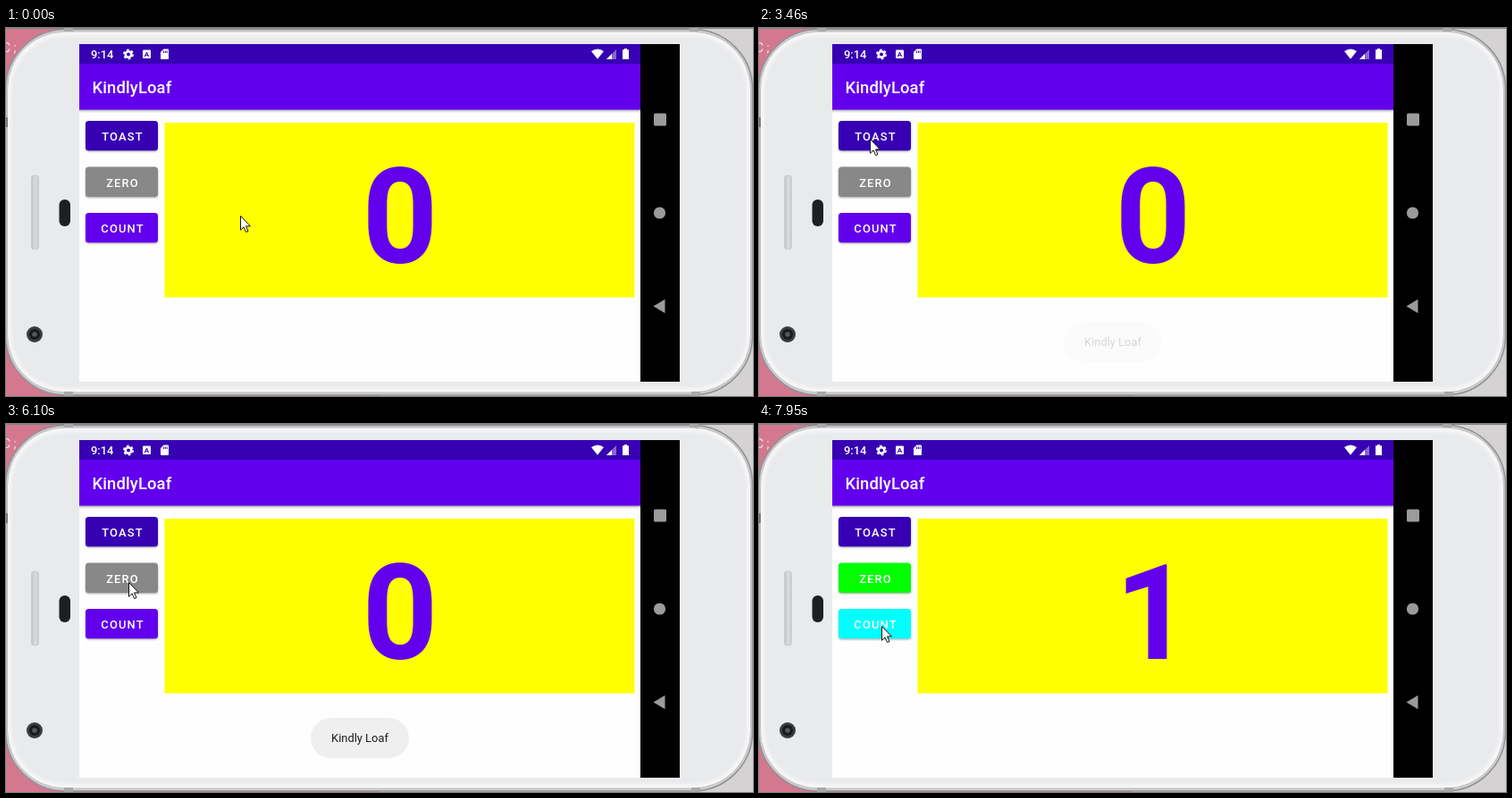
An HTML page for the animation above (8000 ms loop, 836 by 412 pixels).

```html
<!DOCTYPE html>
<html lang="en">
<head>
<meta charset="utf-8">
<title>Toast counter</title>
<style>
  html, body { margin: 0; width: 100%; height: 100%; overflow: hidden; }
  svg { display: block; width: 100%; height: 100%; font-family: Roboto, sans-serif; }
  .label { font-size: 12.9px; font-weight: 500; letter-spacing: 1.15px; fill: #fff; text-anchor: middle; }
  .up { filter: drop-shadow(0 1px 1px rgba(0, 0, 0, .35)); }
  .down { filter: drop-shadow(0 2.5px 3px rgba(0, 0, 0, .42)); }
</style>
</head>
<body>
<svg viewBox="0 0 836 412">
  <defs>
    <linearGradient id="drop" x2="0" y2="1">
      <stop stop-color="#000" stop-opacity=".32"/>
      <stop offset="1" stop-color="#000" stop-opacity="0"/>
    </linearGradient>
    <linearGradient id="slot">
      <stop stop-color="#c3c4c7"/><stop offset=".5" stop-color="#d9dadc"/><stop offset="1" stop-color="#cbccce"/>
    </linearGradient>
  </defs>

  <!-- desk and phone body -->
  <rect width="836" height="412" fill="#d3788f"/>
  <rect x="418" width="418" height="412" fill="#d5d2d4"/>
  <rect width="836" height="1" fill="#858588"/>
  <text x="-4" y="27" font-size="14" fill="#f6e6ea">C ;</text>
  <rect x="-.5" y="1.500" width="836" height="409.500" rx="67" fill="#cfcfd1" stroke="#929296" stroke-width="1.500"/>
  <rect x="1.500" y="4" width="832" height="404" rx="65" fill="#f6f6f7" stroke="#b4b4b7" stroke-width=".8"/>
  <rect x="6" y="9" width="823" height="394" rx="61" fill="#e9eaec" style="filter:blur(1.5px)"/>
  <path d="M65 0h10v4H65zM765 0h10v4h-10zM65 407h10v5H65zM767 407h10v5h-10z" fill="#a9a9ac"/>
  <rect y="100" width="2" height="11" fill="#77777b"/>
  <rect x="28.500" y="165" width="8" height="83" rx="3" fill="url(#slot)" stroke="#c5c6c9" stroke-width=".7"/>
  <rect x="59.500" y="192" width="12.500" height="30" rx="6" fill="#1d2023"/>
  <circle cx="32" cy="343" r="9" fill="#3b3c40"/>
  <circle cx="32" cy="343" r="6" fill="#191a1d"/>
  <circle cx="32" cy="343" r="2.800" fill="#55575d"/>

  <!-- screen -->
  <rect x="82" y="18" width="672" height="378" fill="#fefefe"/>
  <rect x="82" y="91" width="628" height="4" fill="url(#drop)"/>
  <rect x="82" y="39" width="628" height="52.500" fill="#6200ee"/>
  <rect x="82" y="18" width="628" height="22" fill="#3700b3"/>
  <rect x="710" y="18" width="44" height="378"/>
  <g fill="#9b9b9b">
    <rect x="725" y="95.500" width="14" height="14" rx="1.500"/>
    <circle cx="731.500" cy="207" r="6.600"/>
    <path d="M724.500 311.500l13-7.700v15.400z"/>
  </g>

  <!-- status bar -->
  <g fill="#fff">
    <text x="95" y="34" font-size="12.9" font-weight="500">9:14</text>
    <circle cx="137" cy="29.500" r="3.300" fill="none" stroke="#fff" stroke-width="2.600"/>
    <circle cx="137" cy="29.500" r="5.100" fill="none" stroke="#fff" stroke-width="1.700" stroke-dasharray="2.670"/>
    <rect x="153" y="24.500" width="9" height="9.500" rx="1"/>
    <text x="157.500" y="32.200" font-size="8" font-weight="700" text-anchor="middle" fill="#3700b3">A</text>
    <path d="M176.500 23.500h4.500q1 0 1 1v9.500q0 1-1 1h-7q-1 0-1-1v-7z"/>
    <path d="M176.300 25.500v2.500M178.300 25.500v2.500M180.200 25.500v2.500" stroke="#3700b3"/>
    <path d="M655 26q7-5 14 0l-7 8.700z"/>
    <path d="M683 24v11h-11z" opacity=".4"/>
    <path d="M678 29v6h-6z"/>
    <path d="M692 23h3v1.300h2v10.700h-7v-10.700h2z"/>
    <text x="96.500" y="73" font-size="18.4" font-weight="500" letter-spacing=".14">KindlyLoaf</text>
  </g>

  <rect x="177.500" y="106" width="526" height="195.500" fill="#ff0"/>
  <text id="count" x="441" y="262.700" font-size="148" font-weight="700" text-anchor="middle" fill="#6200ee">0</text>
  <g id="buttons"></g>
  <g id="toast">
    <rect x="341" y="329" width="110" height="45" rx="22.500" fill="#efefef"/>
    <text x="396" y="356.300" font-size="12.9" text-anchor="middle" fill="#1c1c1c">Kindly Loaf</text>
  </g>
  <path id="cursor" d="M.5.500v15.700l3.600-3.400 2.500 5.700 2.400-1-2.500-5.600h4.900z" fill="#fff" stroke="#111" stroke-linejoin="round"/>
</svg>
<script>
const LOOP = 8000;
const TICK = 128; // the screen refreshes in coarse steps
const $ = id => document.getElementById(id);
const ramp = (t, from, span) => Math.min(1, Math.max(0, (t - from) / span));

// Turning points of the pointer: time, x, y.
const path = [
  [0, 262, 210], [128, 150, 143], [384, 378, 258], [1024, 350, 258], [1200, 350, 258],
  [1408, 622, 380], [1720, 703, 395], [2432, 45, 81], [2680, 124, 124], [5100, 124, 124],
  [5376, 137, 218], [5700, 137, 177], [7200, 137, 177], [7420, 137, 226], [LOOP, 137, 226]
];

function pointer(t) {
  const i = path.findIndex(p => p[0] > t);
  const [t0, x0, y0] = path[i - 1], [t1, x1, y1] = path[i];
  const k = ramp(t, t0, t1 - t0);
  return [x0 + (x1 - x0) * k, y0 + (y1 - y0) * k];
}

const fade = (t, show, hide) => ramp(t, show, 330) - ramp(t, hide, 330);

// A ripple grows from the press and fades after the release.
const press = (t, start, release, radius) => ({
  r: radius + .13 * (t - start),
  alpha: t < start ? 0 : .24 * (1 - ramp(t, release, 180))
});

function addButton(label, y, cx) {
  const box = `<rect x="89" y="${y}" width="81" height="33.3" rx="3.500"/>`;
  $('buttons').insertAdjacentHTML('beforeend', `
    <g>
      <clipPath id="clip${label}">${box}</clipPath>
      ${box}
      <circle cx="${cx}" cy="${y + 17}" fill="#fff" clip-path="url(#clip${label})"/>
      <text class="label" x="130.500" y="${y + 22}">${label}</text>
    </g>`);
  const group = $('buttons').lastElementChild;
  const face = group.querySelector(':scope > rect');
  const ripple = group.querySelector('circle');
  return (color, { r, alpha } = { r: 0, alpha: 0 }) => {
    face.setAttribute('fill', color);
    face.setAttribute('class', alpha > .2 ? 'down' : 'up');
    ripple.setAttribute('r', Math.max(0, r));
    ripple.setAttribute('opacity', alpha);
  };
}

const drawToast = addButton('TOAST', 104, 128);
const drawZero = addButton('ZERO', 155.6, 130);
const drawCount = addButton('COUNT', 207, 133);

function frame(now) {
  const t = Math.floor(now % LOOP / TICK) * TICK;
  const counted = t > 7800;
  $('cursor').setAttribute('transform', `translate(${pointer(t).map(Math.round)})`);
  $('toast').setAttribute('opacity', fade(t, 3400, 4700) + fade(t, 4960, 6580));
  $('count').textContent = counted ? 1 : 0;
  drawToast('#3700b3', t < 4000 ? press(t, 3072, 3150, 44) : press(t, 4480, 4730, 44));
  drawZero(counted ? '#0f0' : '#888');
  drawCount(counted ? '#0ff' : '#6200ee', press(t, 7552, 7744, 24));
  requestAnimationFrame(frame);
}
requestAnimationFrame(frame);
</script>
</body>
</html>
```
